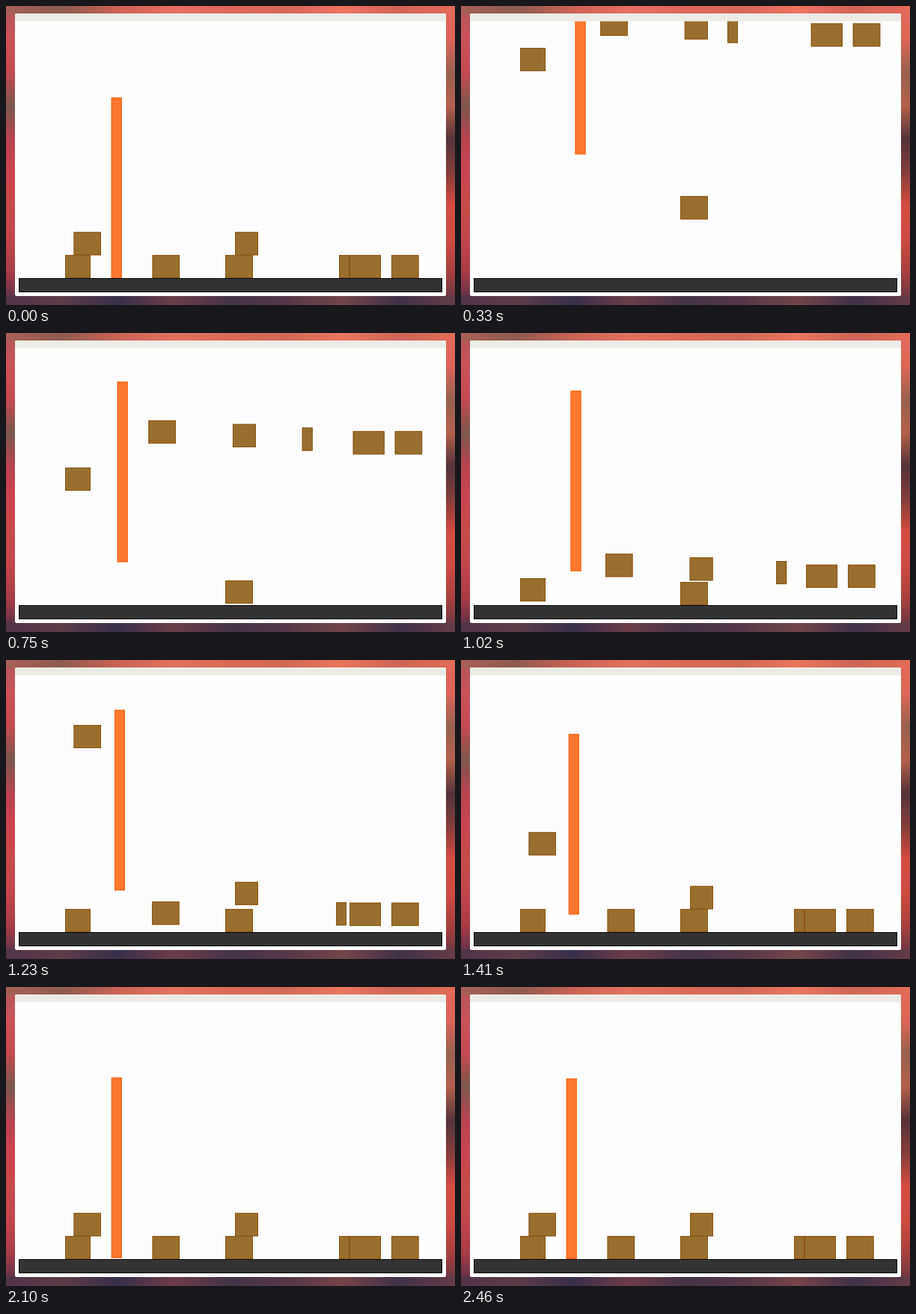
An HTML page with a canvas for the animation above (2.49 s loop, 600 by 400 pixels).

```html
<!DOCTYPE html>
<html lang="en">
<head>
<meta charset="utf-8">
<title>Falling boxes</title>
<style>
  html, body { margin: 0; width: 100%; height: 100%; overflow: hidden; }
  canvas { display: block; width: 600px; height: 400px; }
</style>
</head>
<body>
<canvas id="stage" width="600" height="400"></canvas>
<script>
const ctx = document.getElementById('stage').getContext('2d');
const LOOP = 2490, STEP = 30, G = 0.00117;

const brown = { fill: '#996f30', line: '#885412' };
const orange = { fill: '#ff7830', line: '#f66210' };

// Sideways drift at a steady rate, halted by friction at the resting place.
const drift = (from, rate, rest) => t => {
  const x = from + rate * (t - 510);
  return rate > 0 ? Math.min(x, rest) : Math.max(x, rest);
};
const still = x => () => x;
const slowing = t => 140.7 + 10.1 * Math.pow(Math.max(0, 1 - (t - 510) / 1690), 1.55);

// x: path, w/h: size, y: release height, rest: landing height,
// start: release time, e: bounciness
const box = (x, w, y, rest, start = 320, e = 0.18) =>
  ({ x, w, h: 31, y, rest, start, e, ...brown });

const bodies = [
  box(still(79), 34, 55.1, 333.2, 288),
  box(still(90.5), 36.5, -117.4, 302.4, 639, 0.15),
  box(drift(188, 0.0098, 195.6), 36.5, 8.7, 333.2),
  box(still(293), 37, 253.4, 333.2, 288),
  box(drift(300.6, 0.0098, 306), 31, 13.6, 302.4),
  box(drift(373, 0.0945, 445), 14, 18.4, 333.2),
  box(drift(466, -0.0097, 459), 42, 23.2, 333.2),
  box(drift(522, -0.0097, 515), 36.5, 23.2, 333.2),
  { x: slowing, w: 14, h: 241.5, y: -43.2, rest: 122.5, start: 320, e: 0.592, ...orange }
];

function height(b, t) {
  let s = t - b.start;
  if (s <= 0) return b.y;
  const fall = Math.sqrt(2 * (b.rest - b.y) / G);
  if (s < fall) return b.y + G * s * s / 2;
  s -= fall;
  let v = G * fall * b.e;
  while (v > 0.01) {
    const flight = 2 * v / G;
    if (s < flight) return b.rest - v * s + G * s * s / 2;
    s -= flight;
    v *= b.e;
  }
  return b.rest;
}

function gradient(x, y, w, h, colors) {
  const g = w > h ? ctx.createLinearGradient(x, 0, x + w, 0)
                  : ctx.createLinearGradient(0, y, 0, y + h);
  colors.forEach((c, i) => g.addColorStop(i / (colors.length - 1), c));
  ctx.fillStyle = g;
  ctx.fillRect(x, y, w, h);
}

function panel(x, y, w, h, fill, line) {
  ctx.fillStyle = fill;
  ctx.fillRect(x, y, w, h);
  ctx.strokeStyle = line;
  ctx.lineWidth = 1;
  ctx.strokeRect(x + 0.5, y + 0.5, w - 1, h - 1);
}

function backdrop() {
  gradient(0, 0, 13, 400, ['#b0585c', '#cc5258', '#c44a50', '#7c5850', '#b84452',
    '#cc4450', '#c84a4a', '#c4464c', '#a83c48', '#4c3048']);
  gradient(587, 0, 13, 400, ['#e2685c', '#dc6658', '#986050', '#b4604c', '#54343a',
    '#843c3c', '#d44c40', '#cc4c40', '#a84040', '#5c3444']);
  gradient(0, 0, 600, 11, ['#a86058', '#8c5c50', '#cc6258', '#e47060', '#dc6858',
    '#d46858', '#ec7460', '#d06458', '#e26c58']);
  gradient(0, 387, 600, 13, ['#503448', '#5c3c48', '#38304a', '#6c3c48', '#443448',
    '#543848', '#744448', '#403248', '#643c48']);
  ctx.fillStyle = '#fdfdfd';
  ctx.beginPath();
  ctx.roundRect(12, 10, 576, 378, 2);
  ctx.fill();
  ctx.fillStyle = '#ecebe6';
  ctx.beginPath();
  ctx.roundRect(12, 10, 576, 10.5, [2, 2, 0, 0]);
  ctx.fill();
}

function draw(now) {
  let t = Math.floor(now % LOOP / STEP) * STEP;
  if (t < STEP) t = LOOP;
  backdrop();
  ctx.save();
  ctx.beginPath();
  ctx.rect(12, 20.5, 576, 367.5);
  ctx.clip();
  for (const b of bodies)
    panel(b.x(Math.max(t, b.start)), height(b, t), b.w, b.h, b.fill, b.line);
  panel(17, 364, 566, 19, '#333333', '#0c0c0c');
  ctx.restore();
}

const began = performance.now();
function tick() {
  draw(performance.now() - began);
  requestAnimationFrame(tick);
}
tick();
</script>
</body>
</html>
```
